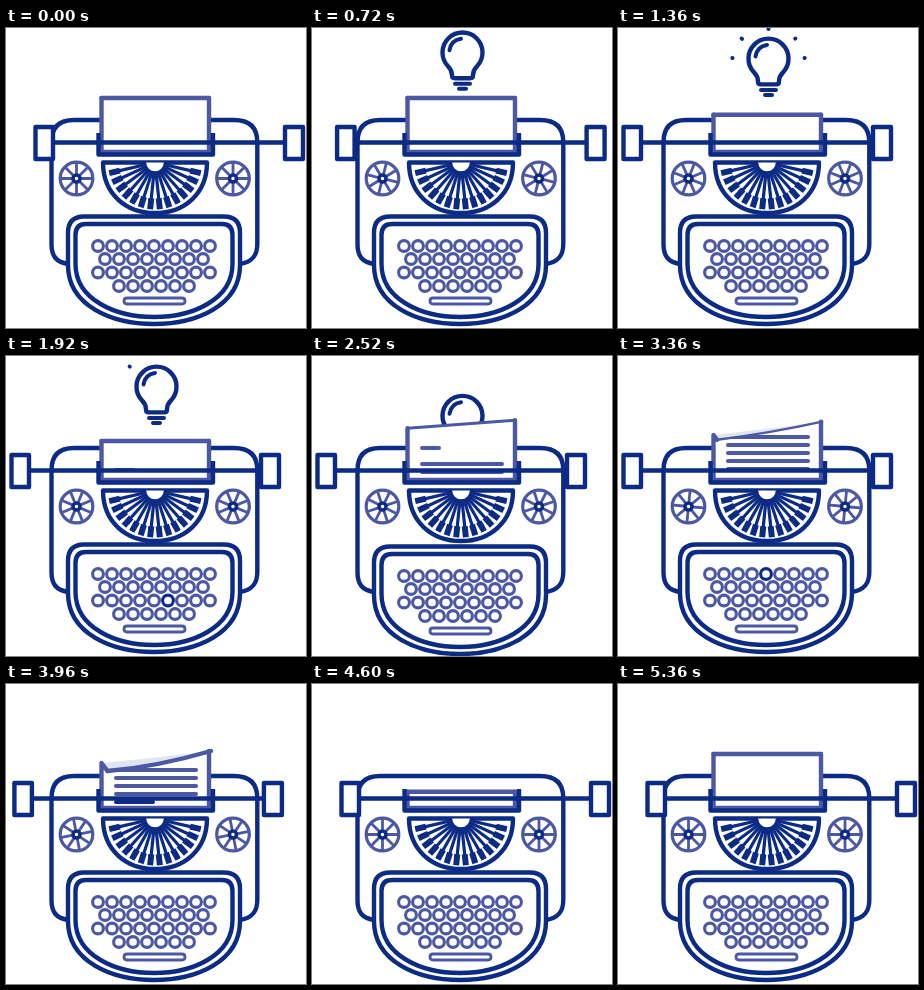
Recreate the animation shown at these times as an HTML page with a canvas. Size 300x300 px, loop 7360 ms.

```html
<!DOCTYPE html>
<html lang="en">
<head>
<meta charset="utf-8">
<title>Typewriter</title>
<style>
html, body { margin: 0; width: 100%; height: 100%; overflow: hidden; background: #fff; }
canvas { display: block; width: 100%; height: 100%; }
</style>
</head>
<body>
<canvas width="300" height="300"></canvas>
<script>
const LOOP = 7360, STEP = 40, BOLD = 4.4;
const NAVY = '#0b2b85', SOFT = '#4c58a3', PALE = '#e1e5f1';
const g = document.querySelector('canvas').getContext('2d');

const clamp = x => Math.max(0, Math.min(1, x));
const ramp = (t, start, len) => clamp((t - start) / len);
const sine = u => (1 - Math.cos(Math.PI * u)) / 2;
const ease = (t, start, end) => sine(ramp(t, start, end - start));
const outQuad = u => u * (2 - u);
const outBack = u => 1 + 2 * (u - 1) ** 3 + (u - 1) ** 2;

function draw(shape, color, width, fill) {
  const path = typeof shape === 'string' ? new Path2D(shape) : shape;
  if (fill) { g.fillStyle = fill; g.fill(path); }
  if (width) { g.strokeStyle = color; g.lineWidth = width; g.stroke(path); }
}
function ring(x, y, r, color, width, fill) {
  const p = new Path2D();
  p.arc(x, y, r, 0, 7);
  draw(p, color, width, fill);
}
function spoke(x, y, angle, from, to, color, width) {
  const c = Math.cos(angle), s = Math.sin(angle);
  draw(`M${x + c * from} ${y + s * from}L${x + c * to} ${y + s * to}`, color, width);
}
function group(x, y, body) {
  g.save();
  g.translate(x, y);
  body();
  g.restore();
}

// Keyboard rows: first x, y, count
const keys = [[92, 218, 9], [99, 231, 8], [92, 244.5, 9], [113, 258, 6]]
  .flatMap(([x, y, n]) => Array.from({ length: n }, (_, i) => [x + 14 * i, y]));
const presses = [12, 3, 22, 28, 8, 14, 19, -1, 1, 25, 10, 6, 30, 17, 4, 20, 11, 24];

// Text lines: offset on the page, typing start, typing end, width
const lines = [[0, 1680, 1880, 17]];
for (let i = 0; i < 6; i++) {
  const end = 2220 + 260 * i;
  lines.push([16 + 8 * i, end - 150, end, 80]);
}
lines.push([64, 3640, 3800, 37]);

function paperFeed(t) {
  if (t >= 4480) return 89 - (127 - 57 * outBack(ramp(t, 4520, 840)));
  let feed = 19 * (1 - ease(t, 1080, 1440));
  lines.slice(0, -1).forEach(([, , end], i) => feed += (i ? 8 : 16) * ramp(t, end, 160));
  return feed - 102 * ease(t, 3960, 4440);
}

function bulb(t) {
  if (t > 3280) return;
  const rise = 61.4 - 69 * ease(t, 60, 770) + 7 * ease(t, 770, 1100);
  const y = rise + 62 * ramp(t, 1940, 1228);
  g.save();
  g.beginPath();
  g.rect(0, 0, 300, 120);
  g.clip();
  group(0, y, () => {
    draw('M143 57Q140 57 140 54Q140 49 136 45A20 20 0 1 1 165 45Q161 49 161 54Q161 57 158 57Z', NAVY, BOLD, '#fff');
    draw('M137.5 29Q139 19 149 17.5M143 62.5H158M147 67.5H154', NAVY, 4);
  });
  g.restore();
}

function rays(t) {
  [0, 42, 90, 138, 180].forEach((deg, i) => {
    const u = (t - 860) / 540, late = i === 3 ? 0 : .12;
    if (u < 0 || u >= 2 - late) return;
    const v = u % 1, a = deg * Math.PI / 180;
    const from = .8 + .2 * ramp(v, .45, .5 - late), to = .8 + .2 * ramp(v, 0, .4);
    const at = k => `${150.5 + 36 * k * Math.cos(a)} ${30 - 29 * k * Math.sin(a)}`;
    draw(`M${at(from)}L${at(to + .005)}`, NAVY, 4);
  });
}

function paper(t) {
  const feed = paperFeed(t), top = 89 - feed;
  if (top > 123) return;
  const curl = t > 1440 && t < 4480 ? ramp(feed, 19, 45) : 0;
  const fold = ramp(curl, .4, .6);
  const left = curl ? 70 + 9 * Math.min(1, 1.6 * curl) : top;
  const right = curl ? 70 - 6 * ramp(curl, 0, .16) + 3 * ramp(curl, .47, .53) : top;
  const fx = 95.5 + 6 * fold, fy = left + 8 * fold, tip = 203 + 2 * fold;
  const bend = 6 * curl - 9 * curl * (1 - curl);
  const edge = `${fx} ${fy}Q150 ${(fy + right) / 2 + bend} ${tip} ${right}`;
  const sheet = new Path2D(`M95.5 124V${left}L${edge}L203 ${right}V124Z`);
  draw(sheet, SOFT, 0, '#fff');
  g.save();
  g.clip(sheet);
  if (t < 4480) for (const [off, start, end, width] of lines) {
    const y = 118 - feed + off, w = width * ramp(t, start, end - start);
    if (w && y > 70 + 14 * curl && y < 123) {
      const fresh = off === 64 || t < end;
      draw(`M110 ${y}h${w}`, fresh ? NAVY : SOFT, 4);
    }
  }
  g.restore();
  if (fold) draw(`M95.5 ${left}L${edge}Q150 ${(left + right) / 2 + 1} 95.5 ${left}Z`, SOFT, 0, PALE);
  draw(`M${fx} ${fy}L95.5 ${left}V124H203V${right}`, SOFT, BOLD);
  // The top edge is seen side-on while it bends over
  draw(`M${edge}`, SOFT, BOLD - 3 * Math.sin(Math.PI * curl));
}

function carriage(t) {
  const x = -27 * ease(t, 630, 970) + 3 * ease(t, 970, 1200) + 24 * outQuad(ramp(t, 3920, 640));
  group(x, 0, () => {
    draw('M47 114.5H279', NAVY, BOLD);
    draw('M29.5 99H47V131H29.5ZM279 99H297V131H279Z', NAVY, BOLD, '#fff');
  });
}

function wheels(t) {
  const turn = 1.75 * Math.PI * ramp(t, 0, 3840) - Math.PI / 2 * outQuad(ramp(t, 3920, 640));
  for (const x of [70.5, 227]) {
    ring(x, 150.5, 16.3, SOFT, 3.2, '#fff');
    for (let i = 0; i < 8; i++) spoke(x, 150.5, turn + i * Math.PI / 4, 5, 15, SOFT, 2.8);
    ring(x, 150.5, 3.5, NAVY, 3.5, '#fff');
  }
}

function basket() {
  draw('M97 134.5H201C201 166 178 185 149 185S97 166 97 134.5Z', NAVY, BOLD, '#fff');
  g.lineCap = 'butt';
  for (let i = 0; i < 14; i++) {
    const a = (13 + i * 154 / 13) * Math.PI / 180;
    spoke(149, 134.5, a, 8, 44, NAVY, 3.2);
    spoke(149, 134.5, a, 36, 47, NAVY, 6);
  }
  g.lineCap = 'round';
  draw('M139.5 134.5A9.5 9.5 0 0 0 158.5 134.5', NAVY, 1.5, '#fff');
}

function keyboard(t) {
  const typing = t >= 1680 && t < 3800;
  const dip = typing ? 1 - Math.cos(2 * Math.PI * (t - 1920) / 240) : 0;
  const pressed = t >= 1680 && t < 3960 ? presses[Math.min(17, Math.floor((t - 1680) / 120))] : -1;
  group(0, dip, () => {
    draw('M78 188.5H218Q234 188.5 234 205V237C234 278 190 296 148 296S62 278 62 237V205Q62 188.5 78 188.5Z', NAVY, BOLD, '#fff');
    draw('M80 196H216Q226.5 196 226.5 207V236C226.5 272 186 289 148 289S69.5 272 69.5 236V207Q69.5 196 80 196Z', NAVY, BOLD);
    keys.forEach(([x, y], i) => ring(x, y, 5.4, i === pressed ? NAVY : SOFT, 3.1));
    draw('M121 270H176Q179 270 179 273T176 276H121Q118 276 118 273T121 270Z', SOFT, 2.8);
  });
}

function frame(now) {
  const t = Math.floor(now % LOOP / STEP) * STEP;
  g.fillStyle = '#fff';
  g.fillRect(0, 0, 300, 300);
  g.lineCap = g.lineJoin = 'round';
  draw('M62 236C50 234 45.5 228 45.5 216V114Q45.5 92 68 92H228Q251.3 92 251.3 114V216C251.3 228 246 234 234 236', NAVY, BOLD);
  bulb(t);
  rays(t);
  paper(t);
  g.lineCap = 'butt';
  draw('M92.5 105V126.5H207V105', NAVY, BOLD);
  g.lineCap = 'round';
  carriage(t);
  wheels(t);
  basket();
  keyboard(t);
}

const begin = performance.now();
function tick() {
  frame(performance.now() - begin);
  requestAnimationFrame(tick);
}
tick();
</script>
</body>
</html>
```
